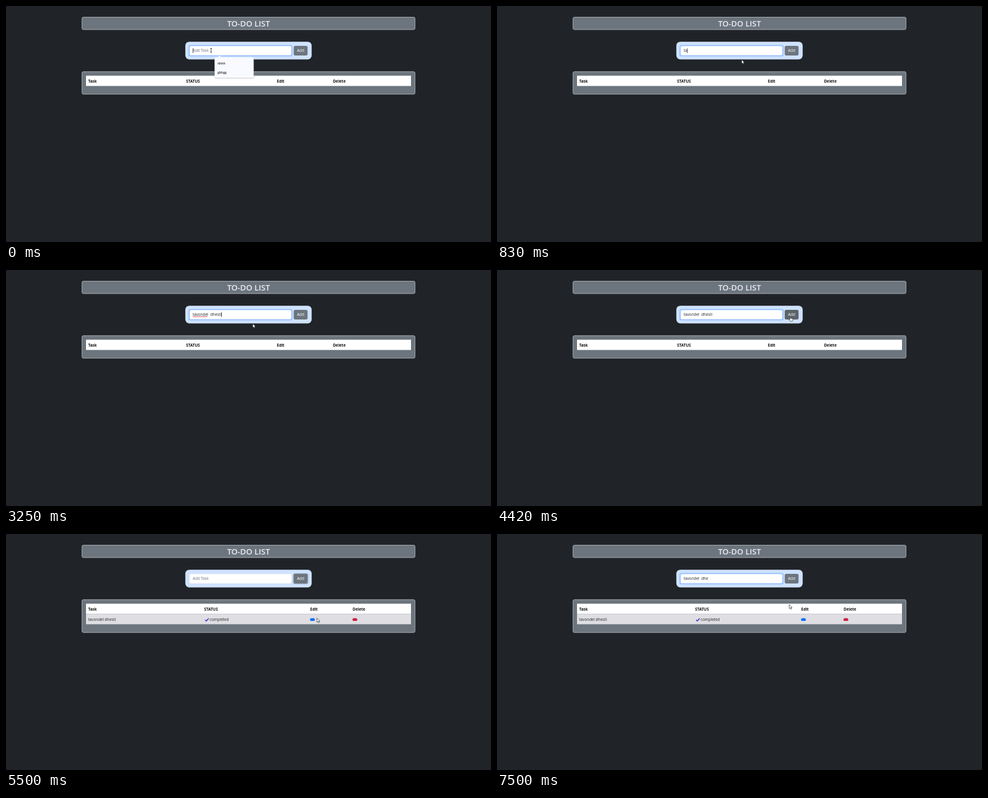
Recreate the animation shown at these times as an HTML page. Size 800 by 391 pixels, loop 8000 ms.

```html
<!DOCTYPE html>
<html lang="en">
<head>
<meta charset="utf-8">
<title>To-do list</title>
<style>
  html, body { margin: 0; width: 100%; height: 100%; overflow: hidden; background: #202428; }
  svg { display: block; width: 100%; height: 100%; }
  text { font: 6.35px "Open Sans", "Noto Sans", sans-serif; fill: #212529; white-space: pre; }
  .title { font-size: 13.1px; font-weight: 600; fill: #e9ecf5; text-anchor: middle; }
  .head { font-size: 6.4px; font-weight: 700; fill: #111; }
  .hint { fill: #6c757d; }
  .light { fill: #fff; }
  .menu { font-size: 5.1px; font-weight: 600; fill: #26292d; }
  .card { fill: #6c757d; stroke: #cdd1d6; stroke-width: .7; }
</style>
</head>
<body>
<svg viewBox="0 0 800 391">
  <rect class="card" x="125.3" y="18.5" width="549.4" height="20.6" rx="2.5"/>
  <text class="title" x="400" y="34">TO-DO LIST</text>

  <rect x="295.8" y="59.2" width="208.4" height="29.2" rx="6.5" fill="#cfe2ff"/>
  <rect id="glow" x="300.9" y="64.4" width="171.8" height="19.2" rx="3.6" fill="#0d6efd" opacity=".27"/>
  <rect id="field" x="302.6" y="66.1" width="168.4" height="15.8" rx="2.3" fill="#fff" stroke-width=".6"/>
  <text id="hint" class="hint" x="307.9" y="76.3">Add Task</text>
  <text id="value" x="307.9" y="76.3"></text>
  <path id="squiggle" fill="none" stroke="#e0333c" stroke-width=".7"/>
  <rect id="caret" y="70" width=".7" height="8" fill="#111"/>
  <rect id="ring" x="473.2" y="64.8" width="25.6" height="18.4" rx="3.6" fill="#828a91" opacity=".5"/>
  <rect id="button" x="474.6" y="66.1" width="22.8" height="15.8" rx="2.5"/>
  <text class="light" x="480.1" y="76.3">Add</text>

  <rect id="panel" class="card" x="125.3" y="108.8" width="549.4" rx="2.5"/>
  <rect x="132" y="115.5" width="536" height="17" fill="#fff"/>
  <text class="head" x="135.5" y="126.5">Task</text>
  <text class="head col" y="126.5">STATUS</text>
  <text class="head col" y="126.5">Edit</text>
  <text class="head col" y="126.5">Delete</text>
  <g id="row">
    <rect x="132" y="132.5" width="536" height="17" fill="#dfdfe3"/>
    <text id="task" x="135.5" y="143.6"></text>
    <path d="M328.4 142.2l2 1.9 4-4.4" fill="none" stroke="#4638c8" stroke-width="1.5"/>
    <text x="335.9" y="143.6">completed</text>
    <rect x="501.6" y="139.5" width="7.8" height="4.6" rx="1.9" fill="#0d6efd"/>
    <rect x="571.6" y="139.5" width="7.8" height="4.6" rx="1.9" fill="#d01f3f"/>
  </g>

  <g id="menu">
    <rect x="343.6" y="86" width="65.6" height="34" rx="2.4" fill="#000" opacity=".2"/>
    <path d="M349 85.5l3.3-3.4 3.3 3.4z" fill="#f8faff"/>
    <rect x="344" y="85" width="64.6" height="34" rx="2" fill="#f8faff"/>
    <text class="menu" x="348.9" y="96.7">nhhh</text>
    <text class="menu" x="348.9" y="111.7">gbhgg</text>
  </g>

  <g id="mouse">
    <path id="arrow" d="M0 0V6.6L1.6 5.2 2.7 7.6 3.8 7.1 2.8 4.8H4.9Z" fill="#fff" stroke="#111" stroke-width=".6"/>
    <path id="beam" d="M-1.5-3.2H1.5M0-3.2V3.2M-1.5 3.2H1.5" fill="none" stroke="#222" stroke-width=".8"/>
    <path id="hand" d="M-.7 0Q0-.8.7 0V3L3.3 3.6Q4.2 4 4 5.2L3.2 7.8H-.6L-2.6 4.9Q-2.4 3.8-.7 5Z" fill="#fff" stroke="#111" stroke-width=".6"/>
  </g>
</svg>
<script>
const LOOP = 8000, TICK = 1000 / 12;
const FIRST = "tavondel", LAST = "dhesti", NAME = FIRST + "  " + LAST;
const $ = id => document.getElementById(id);
const cols = [...document.querySelectorAll(".col")];

// time, number of letters in the field
const typed = [
  [0, 0], [830, 2], [917, 3], [1000, 4], [1330, 5], [1500, 6], [1583, 7],
  [1750, 8], [1833, 9], [2000, 10], [2080, 11], [2417, 12], [2500, 13],
  [2667, 14], [3000, 16], [4583, 0], [5833, 16], [7417, 14], [7500, 13]
];

// time, x, y, pointer shape
const path = [
  [0, 338, 73.5, "beam"], [83, 360, 80, "beam"], [167, 388, 87, "arrow"],
  [250, 403.5, 89, "arrow"], [3240, 403.5, 89, "arrow"], [3250, 407, 89, "arrow"],
  [3917, 407, 89, "arrow"], [4333, 484, 77, "hand"], [4917, 484, 77, "hand"],
  [5000, 498, 92, "arrow"], [5167, 533, 128, "arrow"], [5320, 533, 128, "arrow"],
  [5333, 532, 129, "arrow"], [5417, 532, 129, "arrow"], [5500, 513, 139.5, "arrow"],
  [5583, 506, 140.5, "hand"], [5917, 506, 140.5, "hand"], [6000, 480, 124, "arrow"],
  [6250, 402, 82, "arrow"], [6333, 384, 75, "beam"], [6417, 372, 73, "beam"],
  [6667, 372, 73, "beam"], [6750, 396, 81, "beam"], [6833, 425, 95, "arrow"],
  [7000, 482, 117, "arrow"], [LOOP, 482, 117, "arrow"]
];

const within = (t, a, b) => t >= a && t < b;
const show = (id, on) => $(id).style.display = on ? "" : "none";
const set = (id, key, val) => $(id).setAttribute(key, val);

function last(table, t) {
  let i = 0;
  while (i + 1 < table.length && table[i + 1][0] <= t) i++;
  return i;
}

function moveMouse(t) {
  const i = last(path, t), a = path[i], b = path[i + 1] || a;
  const k = b === a ? 0 : (t - a[0]) / (b[0] - a[0]);
  const x = a[1] + (b[1] - a[1]) * k, y = a[2] + (b[2] - a[2]) * k;
  set("mouse", "transform", `translate(${x} ${y})`);
  ["arrow", "beam", "hand"].forEach(kind => show(kind, kind === a[3]));
}

function draw(ms) {
  const t = Math.floor((ms + 5) / TICK) * TICK + 1;
  const count = typed[last(typed, t)][1];
  const added = t >= 4583, focus = t < 4500 || t >= 6750;

  $("value").textContent = NAME.slice(0, count);
  show("hint", !count);
  show("menu", t < 830);
  show("squiggle", within(t, 2080, 4417));
  show("caret", t < 4000 || within(t, 6417, 7417));
  set("caret", "x", 307.9 + (count ? $("value").getComputedTextLength() : 0));

  show("glow", focus);
  set("field", "stroke", focus ? "#86b7fe" : "#dee2e6");
  show("ring", within(t, 4500, 5667));
  set("button", "fill", within(t, 4333, 5000) ? "#5c636a" : "#6c757d");

  show("row", added);
  set("panel", "height", added ? 54.4 : 37.3);
  const xs = added ? [326.7, 501.8, 571.8] : [297, 446.8, 539.4];
  cols.forEach((el, i) => el.setAttribute("x", xs[i]));
  moveMouse(t);
}

$("task").textContent = FIRST + " " + LAST;
let wave = "M308 78";
for (let i = 0; i < 12; i++) wave += "l1-1.1 1 1.1";
set("squiggle", "d", wave);

const start = performance.now();
function frame() {
  draw((performance.now() - start) % LOOP);
  requestAnimationFrame(frame);
}
frame();
</script>
</body>
</html>
```
